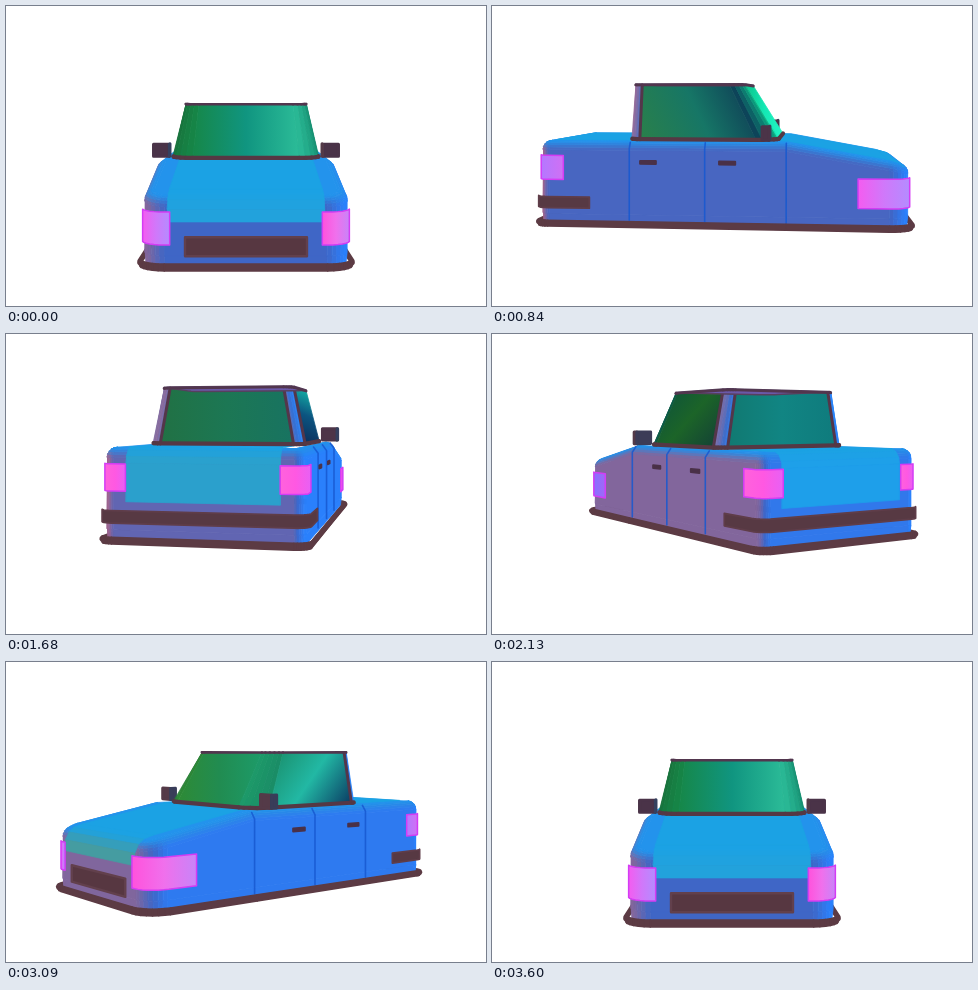
Recreate the animation shown at these times as an HTML page with a canvas. Size 480 px wide and 300 px high, loop 3630 ms.

```html
<!DOCTYPE html>
<html lang="en">
<head>
<meta charset="utf-8">
<title>Turning car</title>
<style>
html, body { margin: 0; width: 100%; height: 100%; overflow: hidden; background: #fff; }
canvas { display: block; }
</style>
</head>
<body>
<canvas id="stage" width="480" height="300"></canvas>
<script>
const g = document.getElementById('stage').getContext('2d');
const LOOP = 3630, STEP = 30, DIST = 780, TILT = 0.08, BOB = 20.5;

// Body size: half width, front, rear, corner radii, belt height
const W = 82, ZF = 165, ZR = -168, RF = 18, RR = 8, BELT = 22.5, EDGE = 8;

let sin = 0, cos = 1;

// ---- colour ----
const rgb = c => [c >> 16, c >> 8 & 255, c & 255];
const hue = (...c) => c.map(rgb);
const mix = (a, b, t) => a.map((v, i) => v + (b[i] - v) * t);
const css = c => `rgb(${c.map(Math.round)})`;
const clamp = (v, a, b) => Math.min(b, Math.max(a, v));

// Three colours: surface turned left, to the viewer, right
function byTurn(set, nx) {
  const t = clamp(nx / 0.8, -1, 1);
  return t < 0 ? mix(set[1], set[0], -t) : mix(set[1], set[2], t);
}

const material = (left, mid, right, top) => ({ side: hue(left, mid, right), top: rgb(top) });
const PAINT = material(0x82669c, 0x3f66c6, 0x2a80fc, 0x2393ec);
const PANEL = material(0x469c9f, 0x22a2dc, 0x1c9ef0, 0x1ba2e4);
const MIRROR = material(0x543a48, 0x4a3348, 0x35405e, 0x5a4a70);
const PINK = rgb(0xc4607c);
const BROWN = '#5c3b44';

function shade(mat, nx, ny, nz) {
  const vx = nx * cos + nz * sin;
  let c = byTurn(mat.side, vx);
  if (mat === PAINT) c = mix(c, PINK, Math.max(0, -nz) * Math.max(0, -vx) * 0.7);
  return css(mix(c, mat.top, clamp(ny, 0, 1) ** 1.3));
}

// ---- projection and drawing ----
const depth = (x, z) => z * cos - x * sin;

function pt(x, y, z) {
  const d = depth(x, z), s = DIST / (DIST - d);
  return [240 + (z * sin + x * cos) * s, 151.5 + (BOB * cos - y + TILT * d) * s];
}

function area(p) {
  return p.reduce((sum, a, i) => {
    const b = p[(i + 1) % p.length];
    return sum + a[0] * b[1] - b[0] * a[1];
  }, 0);
}

function trace(p, closed = true) {
  g.beginPath();
  p.forEach(([x, y]) => g.lineTo(x, y));
  if (closed) g.closePath();
}

function wire(p, color, width, closed = false) {
  trace(p, closed);
  g.strokeStyle = color;
  g.lineWidth = width;
  g.stroke();
}

function poly(p, fill, line = fill, width = 0.8) {
  trace(p);
  g.fillStyle = fill;
  g.fill();
  wire(p, line, width, true);
}

// Gradient from left to right over a shape, leaning by the given slant
function across(p, stops, slant = 0) {
  const xs = p.map(a => a[0]), ys = p.map(a => a[1]);
  const x0 = Math.min(...xs), x1 = Math.max(...xs), y0 = Math.min(...ys), y1 = Math.max(...ys);
  const y = (y0 + y1) / 2, h = (y1 - y0) / 2 * slant;
  const grad = g.createLinearGradient(x0, y - h, x1, y + h);
  stops.forEach((c, i) => grad.addColorStop(i / (stops.length - 1), css(c)));
  return grad;
}

// ---- plan outlines, clockwise on screen from the front left corner ----
const spot = (x, z, nx = 0, nz = 0) => ({ x, z, nx, nz });

function corner(k, w, zf, zr, r, off = 0, n = 7) {
  const cx = (k === 0 || k === 3 ? -1 : 1) * (w - r);
  const cz = k < 2 ? zf - r : zr + r;
  return Array.from({ length: n + 1 }, (_, i) => {
    const a = (k - 1 + i / n) * Math.PI / 2, nx = Math.sin(a), nz = Math.cos(a);
    return spot(cx + nx * (r + off), cz + nz * (r + off), nx, nz);
  });
}
const arc = (k, off) => corner(k, W, ZF, ZR, k < 2 ? RF : RR, off);
const outline = off => [
  ...arc(0, off), ...arc(1, off), spot(W + off, 57, 1),
  ...arc(2, off), ...arc(3, off), spot(-W - off, 57, -1)
];

// Band standing on a plan path; returns the outline of its visible part
function band(path, y0, y1) {
  const top = [], low = [];
  for (let i = 0; i + 1 < path.length; i++) {
    const a = path[i], b = path[i + 1];
    const q = [pt(a.x, y1, a.z), pt(b.x, y1, b.z), pt(b.x, y0, b.z), pt(a.x, y0, a.z)];
    if (area(q) <= 0) continue;
    top.push(q[0], q[1]);
    low.unshift(q[2], q[3]);
  }
  return [...top, ...low];
}

// ---- body ----
const roofline = z => BELT - Math.max(0, z - 57) * 0.18;
const shell = outline(0);
const layers = [{ in: 1, y: () => -53, e: 0 }, { in: 0, y: () => -44, e: 0 }];
for (let k = 0; k <= 5; k++) {
  const e = k * Math.PI / 10;
  layers.push({
    in: EDGE * (1 - Math.cos(e)), e,
    y: z => roofline(z) - EDGE + EDGE * Math.sin(e)
  });
}

function drawBody() {
  const rows = layers.map(l => shell.map(p =>
    pt(p.x - p.nx * l.in, l.y(p.z), p.z - p.nz * l.in)));
  poly(rows[rows.length - 1], css(PAINT.top));
  for (let r = 0; r + 1 < rows.length; r++) {
    const e = (layers[r].e + layers[r + 1].e) / 2, c = Math.cos(e);
    shell.forEach((p, i) => {
      const j = (i + 1) % shell.length, n = shell[j];
      const q = [rows[r + 1][i], rows[r + 1][j], rows[r][j], rows[r][i]];
      if (area(q) > 0)
        poly(q, shade(PAINT, (p.nx + n.nx) / 2 * c, Math.sin(e), (p.nz + n.nz) / 2 * c));
    });
  }
}

// Lighter panel running over an end of the body, given as [z, y] pairs
function drawPanel(line, half, dir) {
  for (let i = 0; i + 1 < line.length; i++) {
    const [z0, y0] = line[i], [z1, y1] = line[i + 1], len = Math.hypot(z1 - z0, y1 - y0);
    const h = half * dir;
    const q = [pt(-h, y0, z0), pt(h, y0, z0), pt(h, y1, z1), pt(-h, y1, z1)];
    if (area(q) > 0)
      poly(q, shade(PANEL, 0, Math.abs(z1 - z0) / len, dir * Math.abs(y1 - y0) / len));
  }
}
const HOOD = [[48, 23], [57, 22.7], [148, 6.5], [157, 4], [162, 0], [165.3, -7], [165.5, -17]];
const TRUNK = [[-86, 22.8], [-159, 22.8], [-164, 20.5], [-167.5, 15.5], [-168.3, 10], [-168.3, -21]];

function drawSide(s) {
  const x = s * (W + 0.3);
  const plate = (z0, z1, y0, y1) => {
    const a = s > 0 ? z0 : z1, b = s > 0 ? z1 : z0;
    return [pt(x, y1, a), pt(x, y1, b), pt(x, y0, b), pt(x, y0, a)];
  };
  if (area(plate(100, -100, -40, 10)) <= 0) return;
  for (const z of [57, -16, -85])
    wire([pt(x, -49, z), pt(x, 16, z), pt(x - s * 4, 21.5, z)], 'rgba(22,88,208,.85)', 1.6);
  for (const z of [12, -60])
    poly(plate(z - 0.5, z - 15, 2.3, 5), '#4a3148', '#4a3148', 2);
}

function drawLight(path, y0, y1, ...colors) {
  const p = band(path, y0, y1);
  if (p.length) poly(p, across(p, hue(...colors)), '#d43cf4', 1.5);
}

function drawLights() {
  const o = 1.8, away = cos < 0;
  const left = away ? [0xff5ce0, 0xff70dc] : [0xf45cf0, 0xd078fa, 0xb48cff];
  const right = away ? [0x8a70ff, 0xa068f8] : [0xff52dc, 0xf070ec, 0xc884f8];
  const tail = away ? [0xff62dc, 0xff58e2, 0xe860f4] : [0xb478ff, 0xd070f4];
  drawLight([spot(-W - o, 120), ...arc(0, o), spot(-60, ZF + o)], -35, -9, ...left);
  drawLight([spot(60, ZF + o), ...arc(1, o), spot(W + o, 120)], -35, -9, ...right);
  drawLight([spot(W + o, -146), ...arc(2, o), spot(63, ZR - o)], -12.5, 9.5, ...tail);
  drawLight([spot(-63, ZR - o), ...arc(3, o), spot(-W - o, -146)], -12.5, 9.5, ...tail);
}

function drawBumpers() {
  const o = 4, z = ZF + 1;
  const p = band([spot(W + o, -121), ...arc(2, o), ...arc(3, o), spot(-W - o, -121)], -38, -28);
  if (p.length) poly(p, '#573943', '#5f3d49', 1.8);
  const q = [pt(-48, -29, z), pt(48, -29, z), pt(48, -44, z), pt(-48, -44, z)];
  if (area(q) > 0) poly(q, '#573741', '#62404c', 2.4);
}

// ---- floor rail ----
const rail = outline(4);
const drawRail = () => wire(rail.map(p => pt(p.x, -52, p.z)), BROWN, 5.5, true);
function drawNearRail() {
  for (let i = 0; i < rail.length; i++) {
    const p = band([rail[i], rail[(i + 1) % rail.length]], -54.8, -49.5);
    if (p.length) poly(p, BROWN, BROWN, 1.6);
  }
}

// ---- cabin ----
const KINDS = ['front', 'right', 'rear', 'left'];
const NORMAL = [[0, 1], [1, 0], [0, -1], [-1, 0]];
const GLASS = {
  front: [hue(0x2f8a34, 0x228c50, 0x1d9a68), hue(0x168748, 0x109580, 0x2cbc98), hue(0x0cc48c, 0x14e8b4, 0x22f4c4)],
  right: [hue(0x0a5040, 0x1c6428, 0x123c38), hue(0x35904e, 0x127068, 0x0c2c58), hue(0x128a6c, 0x26ccb4, 0x083662)],
  rear: [hue(0x2f6a20, 0x346f1c, 0x2f6420), hue(0x1c7450, 0x147a68, 0x107878), hue(0x0c7c80, 0x108a90, 0x0e7c80)],
  left: [hue(0x063c3c, 0x1c5c24, 0x186c38), hue(0x2f8a4c, 0x157a70, 0x0c2e58), hue(0x0c2856, 0x0c5480, 0x14ccb0)]
};
const SLANT = { front: 0, right: 1, rear: 0, left: -1 };
const CABIN_TOP = 74, CABIN_LOW = 24;
const upper = [0, 1, 2, 3].map(k => corner(k, 60, 18, -86, k < 2 ? 14 : 8, 0, 5));
const lower = [0, 1, 2, 3].map(k => corner(k, 70, 49, -87, k < 2 ? 20 : 9, 0, 5));

function glassStops(i) {
  const [nx, nz] = NORMAL[i], set = GLASS[KINDS[i]];
  return [0, 1, 2].map(s => byTurn(set.map(c => c[s]), nx * cos + nz * sin));
}

function drawCabin() {
  const trims = [], posts = [];
  const pane = (a, b, c, d, fill) => {
    const q = [pt(a.x, CABIN_TOP, a.z), pt(b.x, CABIN_TOP, b.z), pt(c.x, CABIN_LOW, c.z), pt(d.x, CABIN_LOW, d.z)];
    if (area(q) <= 0) return;
    poly(q, fill(q));
    trims.push(q);
    return q;
  };
  for (let k = 0; k < 4; k++) {
    const j = (k + 1) % 4, t = upper[k], l = lower[k], n = t.length - 1;
    const from = glassStops((k + 3) % 4)[2], to = glassStops(k)[0];
    for (let i = 0; i < n; i++) {
      const color = k < 2 ? css(mix(from, to, (i + 0.5) / n)) : shade(PAINT, t[i].nx, 0.25, t[i].nz);
      const q = pane(t[i], t[i + 1], l[i + 1], l[i], () => color);
      if (q && k > 1 && i === 0) posts.push([q[0], q[3]]);
      if (q && k > 1 && i === n - 1) posts.push([q[1], q[2]]);
    }
    pane(t[n], upper[j][0], lower[j][0], l[n], q => across(q, glassStops(k), SLANT[KINDS[k]]));
  }
  posts.forEach(p => wire(p, '#54364a', 3));
  const roof = upper.flat().map(p => pt(p.x, CABIN_TOP + 1, p.z));
  if (area(roof) > 0) poly(roof, '#6a58a8', '#57405e', 1.5);
  for (const q of trims) {
    wire([q[0], q[1]], '#52364e', 2.6);
    wire([q[3], q[2]], '#553844', 4.2);
  }
}

function drawMirror(s) {
  const x0 = s * 80 - 7.5, x1 = s * 80 + 7.5, z0 = 36, z1 = 42, y0 = 25, y1 = 36.5;
  const c = [spot(x0, z1), spot(x1, z1), spot(x1, z0), spot(x0, z0)];
  c.forEach((p, i) => {
    const q = band([p, c[(i + 1) % 4]], y0, y1);
    const color = shade(MIRROR, NORMAL[i][0], 0, NORMAL[i][1]);
    if (q.length) poly(q, color, color, 3);
  });
  const lid = c.map(p => pt(p.x, y1, p.z));
  if (area(lid) > 0) poly(lid, css(MIRROR.top));
}

function draw(now) {
  const a = Math.floor(now % LOOP / STEP) * 3 * Math.PI / 180;
  sin = Math.sin(a);
  cos = Math.cos(a);
  g.fillStyle = '#fff';
  g.fillRect(0, 0, 480, 300);
  drawRail();
  drawBody();
  drawPanel(HOOD, 62, 1);
  drawPanel(TRUNK, 63, -1);
  drawSide(1);
  drawSide(-1);
  drawLights();
  drawBumpers();
  drawNearRail();
  const order = [1, -1].sort((p, q) => depth(p * 80, 40) - depth(q * 80, 40));
  drawMirror(order[0]);
  drawCabin();
  drawMirror(order[1]);
}

g.lineJoin = g.lineCap = 'round';
function tick() {
  draw(performance.now());
  requestAnimationFrame(tick);
}
tick();
</script>
</body>
</html>
```
